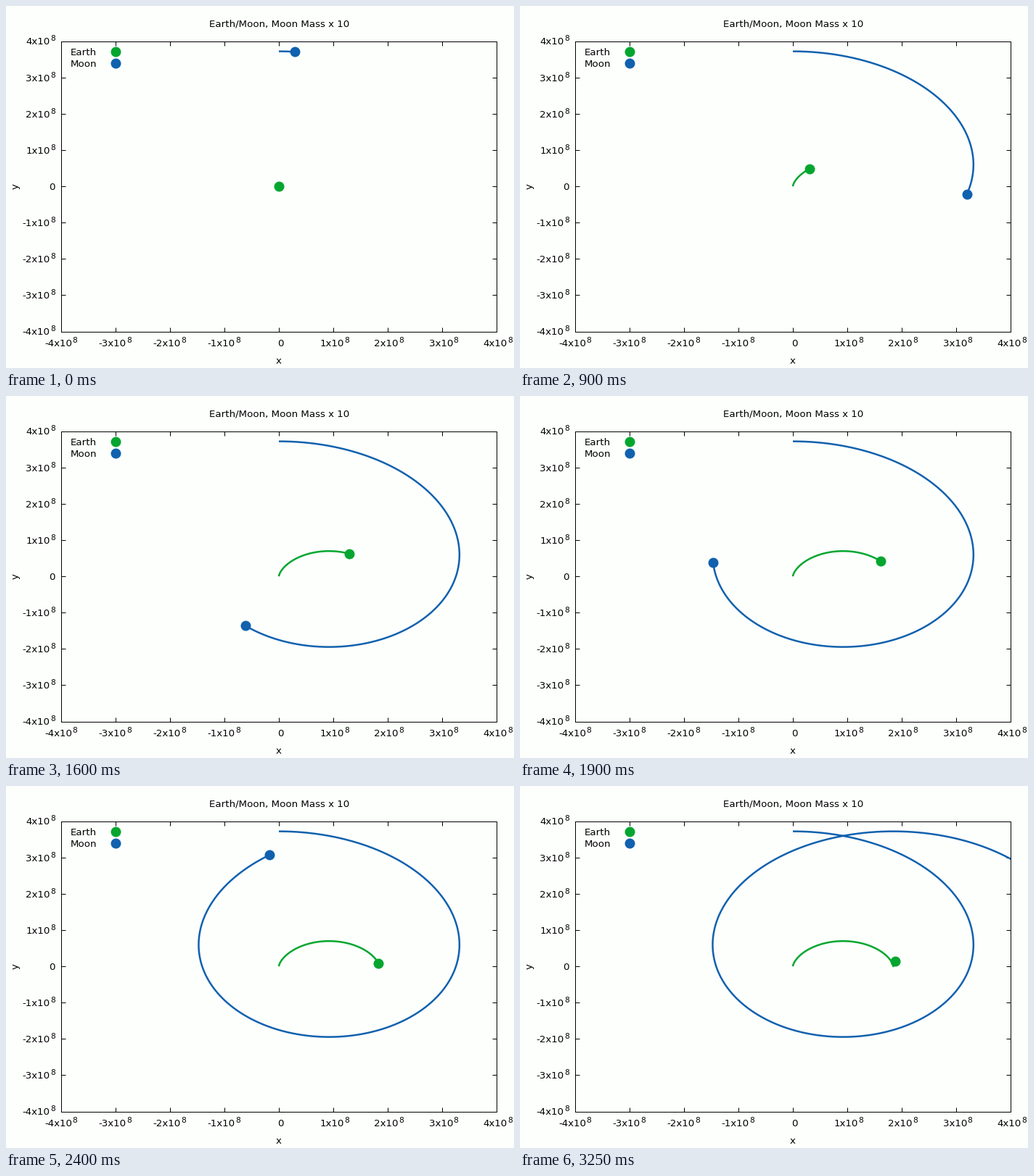
Animation, 700 px wide and 500 px high, one loop 3300 ms. Source, as a matplotlib script:

```python
import numpy as np
import matplotlib.pyplot as plt
from matplotlib.animation import FuncAnimation

W, H, DPI = 700, 500, 100
PX = 72 / DPI
FRAMES, INTERVAL = 66, 50
BACK, GREEN, BLUE = "#fdfffd", "#04a62f", "#1061ae"

# Two-body setup: Earth at rest, Moon (ten times its mass) at apogee
G, M_EARTH, M_MOON = 6.67e-11, 5.98e24, 7.35e23
R0, V0 = 3.72e8, 1000.0
STEP = 30000.0      # seconds per frame
SUBSTEPS = 8

GM = G * (M_EARTH + M_MOON)
MU = M_MOON / (M_EARTH + M_MOON)
A = 1 / (2 / R0 - V0 ** 2 / GM)
ECC = R0 / A - 1
B = A * np.sqrt(1 - ECC ** 2)
RATE = np.sqrt(GM / A ** 3)


def orbit(t):
    """Positions of Earth and Moon at the times t."""
    mean = RATE * t
    anom = mean.copy()
    for _ in range(12):
        anom -= (anom + ECC * np.sin(anom) - mean) / (1 + ECC * np.cos(anom))
    rel = np.array([B * np.sin(anom), A * (np.cos(anom) + ECC)])
    center = np.array([MU * V0 * t, np.full_like(t, MU * R0)])
    return center - MU * rel, center + (1 - MU) * rel


earth, moon = orbit(np.arange(FRAMES * SUBSTEPS + 1) * STEP / SUBSTEPS)

plt.rcParams["font.family"] = "DejaVu Sans"
fig = plt.figure(figsize=(W / DPI, H / DPI), dpi=DPI, facecolor=BACK)
# Kept off half pixels so that the border snaps predictably
LEFT, RIGHT, TOP, BOTTOM = 76, 676, 48.6, 449.6
ax = fig.add_axes([LEFT / W, 1 - BOTTOM / H, (RIGHT - LEFT) / W, (BOTTOM - TOP) / H],
                  facecolor=BACK)
ax.set(xlim=(-4e8, 4e8), ylim=(-4e8, 4e8))
ticks = np.arange(-4, 5)
ax.set_xticks(ticks * 1e8, [])
ax.set_yticks(ticks * 1e8, [])
ax.tick_params(direction="in", top=True, right=True, length=6 * PX, width=PX)
for spine in ax.spines.values():
    spine.set_linewidth(PX)


def label(x, y, text, size=13.33, ha="left", **kw):
    fig.text(x / W, 1 - y / H, text, fontsize=size * PX, ha=ha, va="baseline", **kw)


def power(right, base, n):
    """Tick label n x 10^8 that ends at the given right edge."""
    label(right - 6.8, base, f"{n}x10", ha="right")
    label(right, base - 5, "8", size=10.67, ha="right")


for n in ticks:
    x = LEFT + (n + 4) * (RIGHT - LEFT) / 8
    y = BOTTOM - (n + 4) * (BOTTOM - TOP) / 8
    if n:
        power(x + 21.7, 470, n)
        power(67.5, y + 4.8, n)
    else:
        label(x + 6.9, 470, "0", ha="right")
        label(67.5, y + 4.8, "0", ha="right")

label(377, 29, "Earth/Moon, Moon Mass x 10", ha="center")
label(376, 494, "x", ha="center")
label(17, 248.6, "y", ha="center", rotation=90, rotation_mode="anchor")


def disc(color, **kw):
    return ax.plot([], [], "o", color=color, ms=14 * PX, mew=0, zorder=4, **kw)[0]


def trail(color):
    return ax.plot([], [], color=color, lw=2.5 * PX, solid_capstyle="butt", zorder=2)[0]


for name, color, y in (("Earth", GREEN, 63), ("Moon", BLUE, 79)):
    label(89, y + 5, name)
    key = disc(color, transform=ax.transAxes)
    key.set_data([(151 - LEFT) / (RIGHT - LEFT)], [(BOTTOM - y) / (BOTTOM - TOP)])

bodies = [(path, trail(color), disc(color, clip_on=False))
          for path, color in ((earth, GREEN), (moon, BLUE))]


def draw(i):
    last = (i + 1) * SUBSTEPS
    for path, line, dot in bodies:
        line.set_data(path[0, :last + 1], path[1, :last + 1])
        x, y = path[:, last]
        dot.set_data([x], [y])
        dot.set_visible(abs(x) <= 4e8)
    return [artist for body in bodies for artist in body[1:]]


anim = FuncAnimation(fig, draw, frames=FRAMES, interval=INTERVAL,
                     repeat=True, repeat_delay=0, blit=False)
plt.show()
```
